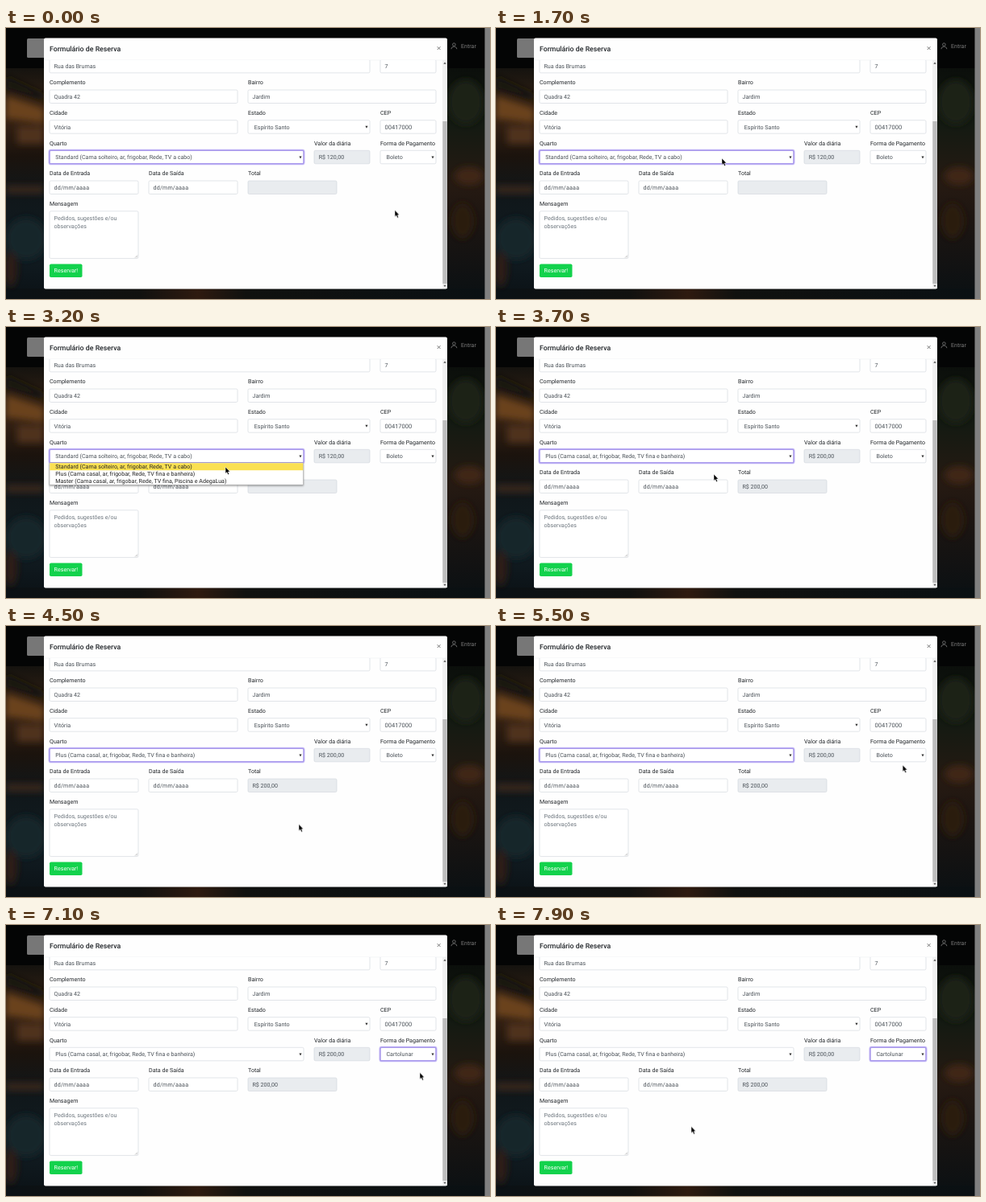
An HTML page that plays this animation: 600x337 px, repeating every 8 s.

```html
<!DOCTYPE html>
<html lang="pt-BR">
<head>
<meta charset="utf-8">
<title>Formulário de Reserva</title>
<style>
html, body { margin: 0; width: 100%; height: 100%; overflow: hidden; background: #070808; }
svg { display: block; width: 100vw; height: 100vh; }
text { font: 7.1px Roboto, sans-serif; text-rendering: geometricPrecision; white-space: pre; }
.label text { fill: #212529; }
.value text { fill: #495057; }
.hint text { fill: #6c757d; }
.option text { fill: #222; }
.box rect { fill: #fff; stroke: #ced4da; stroke-width: .6; }
.box .off { fill: #e9ecef; }
.ring { fill: none; stroke: #c3b8f5; stroke-width: 2.2; }
.ring + rect { fill: none; stroke: #8a74e0; stroke-width: .6; }
.list { fill: #fff; stroke: #a9a9a9; stroke-width: .6; filter: drop-shadow(0 1px 1.2px #0006); }
.mark { fill: #fae052; }

/* Every state shares one 8 s loop: 1% = 80 ms */
.loop { animation: 8s step-end infinite; }
.room-list { animation-name: room-list; }
.room-mark { animation-name: room-mark; }
.pay-list { animation-name: pay-list; }
.pay-mark { animation-name: pay-mark; }
.room-old { animation-name: room-old; }
.room-new { animation-name: room-new; }
.pay-old { animation-name: pay-old; }
.pay-new { animation-name: pay-new; }
.room-focus { animation-name: room-focus; }
.pay-focus { animation-name: pay-focus; }
.cursor { animation-name: cursor; }

@keyframes room-list { 0%, 46.25%, 100% { visibility: hidden } 25% { visibility: visible } }
@keyframes room-mark { 0% { transform: none } 42.5%, 100% { transform: translateY(8.8px) } }
@keyframes pay-list { 0%, 87.5%, 100% { visibility: hidden } 72.5% { visibility: visible } }
@keyframes pay-mark {
  0% { transform: translateY(26.6px) }
  80% { transform: none }
  82.5%, 100% { transform: translateY(8.9px) }
}
@keyframes room-old { 0% { visibility: visible } 46.25%, 100% { visibility: hidden } }
@keyframes room-new { 0% { visibility: hidden } 46.25%, 100% { visibility: visible } }
@keyframes pay-old { 0% { visibility: visible } 87.5%, 100% { visibility: hidden } }
@keyframes pay-new { 0% { visibility: hidden } 87.5%, 100% { visibility: visible } }
@keyframes room-focus { 0% { visibility: visible } 72.5%, 100% { visibility: hidden } }
@keyframes pay-focus { 0% { visibility: hidden } 72.5%, 100% { visibility: visible } }
@keyframes cursor {
  0% { transform: translate(482px, 226.5px) }
  13.75% { transform: translate(482px, 226.5px); animation-timing-function: steps(7, start) }
  22.5% { transform: translate(280px, 162px) }
  33.75% { transform: translate(280px, 162px); animation-timing-function: steps(6, start) }
  41.25% { transform: translate(272px, 174px); animation-timing-function: steps(2, start) }
  43.75% { transform: translate(270px, 183px) }
  52.5% { transform: translate(270px, 183px); animation-timing-function: steps(4, start) }
  57.5% { transform: translate(363px, 246.5px); animation-timing-function: steps(5, start) }
  63.75% { transform: translate(440px, 220px); animation-timing-function: steps(6, start) }
  71.25% { transform: translate(517px, 163.5px) }
  78.75% { transform: translate(517px, 163.5px); animation-timing-function: steps(4, start) }
  83.75% { transform: translate(513px, 183.5px) }
  91.25% { transform: translate(513px, 183.5px); animation-timing-function: steps(7, start) }
  100% { transform: translate(242px, 250.5px) }
}
</style>
</head>
<body>
<svg viewBox="0 0 600 337" preserveAspectRatio="none">
  <defs>
    <linearGradient id="left" x2="0" y2="1">
      <stop offset="0" stop-color="#15130f"/>
      <stop offset=".2" stop-color="#3a2414"/>
      <stop offset=".38" stop-color="#1b130d"/>
      <stop offset=".55" stop-color="#10171a"/>
      <stop offset=".8" stop-color="#111c22"/>
      <stop offset="1" stop-color="#0b1115"/>
    </linearGradient>
    <linearGradient id="right" x2="0" y2="1">
      <stop offset="0" stop-color="#0b0f0b"/>
      <stop offset=".25" stop-color="#141a12"/>
      <stop offset=".5" stop-color="#261a12"/>
      <stop offset=".65" stop-color="#1d1511"/>
      <stop offset="1" stop-color="#0a1013"/>
    </linearGradient>
    <linearGradient id="bottom">
      <stop offset="0" stop-color="#0b1115"/>
      <stop offset=".28" stop-color="#11110f"/>
      <stop offset=".4" stop-color="#2e1a0f"/>
      <stop offset=".5" stop-color="#10110f"/>
      <stop offset="1" stop-color="#0a1013"/>
    </linearGradient>
    <filter id="soft" x="-50%" y="-50%" width="200%" height="200%"><feGaussianBlur stdDeviation="4"/></filter>
    <clipPath id="photo"><path d="M0 50H594V337H0z"/></clipPath>
    <clipPath id="body"><path d="M47 40H547V324H47z"/></clipPath>
    <path id="arrow" d="M-1.6-1.3H1.6L0 1.8z" fill="#333"/>
  </defs>

  <!-- Dimmed page -->
  <rect width="600" height="337" fill="#040505"/>
  <g clip-path="url(#photo)">
    <rect y="50" width="300" height="287" fill="url(#left)"/>
    <rect x="300" y="50" width="294" height="287" fill="url(#right)"/>
    <rect y="324" width="594" height="13" fill="url(#bottom)"/>
    <g filter="url(#soft)">
      <path d="M0 84L47 100V118L0 112z" fill="#6b421d"/>
      <path d="M14 122H47V144H14z" fill="#50301a"/>
      <path d="M0 60L47 82V90L0 76z" fill="#17130e"/>
      <path d="M0 196H47V206H0z" fill="#38271b"/>
      <ellipse cx="25" cy="262" rx="25" ry="26" fill="#16252c"/>
      <ellipse cx="6" cy="300" rx="8" ry="22" fill="#2e1b12"/>
      <ellipse cx="570" cy="92" rx="22" ry="28" fill="#1a2118"/>
      <ellipse cx="574" cy="184" rx="18" ry="11" fill="#402718"/>
      <ellipse cx="566" cy="240" rx="14" ry="22" fill="#2b1a11"/>
    </g>
  </g>
  <rect x="26" y="13" width="24" height="24" rx="1.5" fill="#777"/>
  <g fill="none" stroke="#808080" stroke-width=".8">
    <circle cx="555.4" cy="20.6" r="1.8"/>
    <path d="M552 26.2c0-4 6.8-4 6.8 0"/>
  </g>
  <text x="564" y="25" fill="#7d7d7d">Entrar</text>
  <rect x="593.5" width="6.5" height="337" fill="#808080"/>

  <!-- Dialog -->
  <rect x="47" y="12.5" width="500" height="312" rx="2" fill="#fefefe"/>
  <text x="54" y="29.4" fill="#212529" style="font-size:8.78px;font-weight:500">Formulário de Reserva</text>
  <path d="M534.7 23.2l3.8 3.8m0-3.8l-3.8 3.8" stroke="#777" stroke-width="1"/>
  <path d="M47 39.9H547" stroke="#e9ecef" stroke-width=".5"/>

  <rect x="541" y="40" width="6" height="284" fill="#f1f1f1"/>
  <rect x="541.3" y="116" width="5.4" height="202" fill="#bdbdbd"/>
  <path d="M542.3 44.8h3.4l-1.7-2.2zM542.3 319.8h3.4l-1.7 2.2z" fill="#555"/>

  <g class="box" clip-path="url(#body)">
    <rect x="54" y="39.3" width="397" height="16.5" rx="1.6"/>
    <rect x="464" y="39.3" width="69" height="16.5" rx="1.6"/>
    <rect x="54" y="77" width="233" height="16.5" rx="1.6"/>
    <rect x="300" y="77" width="233" height="16.5" rx="1.6"/>
    <rect x="54" y="114.7" width="233" height="16.5" rx="1.6"/>
    <rect x="300" y="114.7" width="151" height="16.5" rx="1.6"/>
    <rect x="464" y="114.7" width="69" height="16.5" rx="1.6"/>
    <rect x="54" y="152.3" width="315" height="16.5" rx="1.6"/>
    <rect class="off" x="382" y="152.3" width="69" height="16.5" rx="1.6"/>
    <rect x="464" y="152.3" width="69" height="16.5" rx="1.6"/>
    <rect x="54" y="190" width="110" height="16.5" rx="1.6"/>
    <rect x="177" y="190" width="110" height="16.5" rx="1.6"/>
    <rect class="off" x="300" y="190" width="110" height="16.5" rx="1.6"/>
    <rect x="54" y="227.8" width="110" height="58.8" rx="1.6"/>
  </g>
  <path d="M160 285.6l3-3m-1.3 3l1.3-1.3" stroke="#888" stroke-width=".5"/>

  <g class="loop room-focus">
    <rect class="ring" x="53.6" y="151.9" width="315.8" height="17.3" rx="2"/>
    <rect x="54" y="152.3" width="315" height="16.5" rx="1.6"/>
  </g>
  <g class="loop pay-focus">
    <rect class="ring" x="463.6" y="151.9" width="69.8" height="17.3" rx="2"/>
    <rect x="464" y="152.3" width="69" height="16.5" rx="1.6"/>
  </g>
  <use href="#arrow" x="447" y="123"/>
  <use href="#arrow" x="365" y="160.7"/>
  <use href="#arrow" x="529" y="160.7"/>

  <g class="label">
    <text x="54" y="70.3">Complemento</text>
    <text x="300" y="70.3">Bairro</text>
    <text x="54" y="108">Cidade</text>
    <text x="300" y="108">Estado</text>
    <text x="464" y="108">CEP</text>
    <text x="54" y="145.6">Quarto</text>
    <text x="382" y="145.6">Valor da diária</text>
    <text x="464" y="145.6">Forma de Pagamento</text>
    <text x="54" y="183.4">Data de Entrada</text>
    <text x="177" y="183.4">Data de Saída</text>
    <text x="300" y="183.4">Total</text>
    <text x="54" y="221">Mensagem</text>
  </g>

  <g class="value">
    <text x="59.5" y="50.2">Rua das Brumas</text>
    <text x="469.5" y="50.2">7</text>
    <text x="59.5" y="87.9">Quadra 42</text>
    <text x="305.5" y="87.9">Jardim</text>
    <text x="59.5" y="125.5">Vitória</text>
    <text x="307.7" y="125.5">Espírito Santo</text>
    <text x="469.5" y="125.5" style="font-size:7.5px">00417000</text>
    <text x="59.5" y="200.8" letter-spacing=".2">dd/mm/aaaa</text>
    <text x="182.5" y="200.8" letter-spacing=".2">dd/mm/aaaa</text>
    <g class="loop room-old">
      <text x="61.3" y="163.2">Standard (Cama solteiro, ar, frigobar, Rede, TV a cabo)</text>
      <text x="387.7" y="163.2">R$ 120,00</text>
    </g>
    <g class="loop room-new">
      <text x="61.3" y="163.2">Plus (Cama casal, ar, frigobar, Rede, TV fina e banheira)</text>
      <text x="387.7" y="163.2">R$ 200,00</text>
      <text x="305.5" y="200.8">R$ 200,00</text>
    </g>
    <text class="loop pay-old" x="471.5" y="163.2">Boleto</text>
    <text class="loop pay-new" x="471.5" y="163.2">Cartolunar</text>
  </g>

  <g class="hint">
    <text x="59.5" y="238.6">Pedidos, sugestões e/ou</text>
    <text x="59.5" y="249">observações</text>
  </g>
  <rect x="54" y="293.4" width="40.5" height="16.7" rx="1.8" fill="#12d24c"/>
  <text x="59.6" y="304.2" fill="#fff">Reservar!</text>

  <!-- Open lists -->
  <g class="option loop room-list">
    <rect class="list" x="54" y="169" width="314.5" height="27.2"/>
    <rect class="mark loop room-mark" x="54.3" y="169.3" width="313.9" height="8.9"/>
    <text x="61.3" y="176.2">Standard (Cama solteiro, ar, frigobar, Rede, TV a cabo)</text>
    <text x="61.3" y="185">Plus (Cama casal, ar, frigobar, Rede, TV fina e banheira)</text>
    <text x="61.3" y="193.7">Master (Cama casal, ar, frigobar, Rede, TV fina, Piscina e AdegaLua)</text>
  </g>
  <g class="option loop pay-list">
    <rect class="list" x="464" y="169" width="69" height="36.4"/>
    <rect class="mark loop pay-mark" x="464.3" y="169.3" width="68.4" height="8.9"/>
    <text x="471.5" y="176.2">Nelo</text>
    <text x="471.5" y="185">Cartolunar</text>
    <text x="471.5" y="193.8">Southern Paylane</text>
    <text x="471.5" y="202.7">Boleto</text>
  </g>

  <path class="loop cursor" d="M0 0V8.2L1.8 6.6L3.1 9.6L4.6 8.9L3.3 6.1L5.6 5.9z" fill="#000" stroke="#fff" stroke-width=".5"/>
</svg>
</body>
</html>
```
